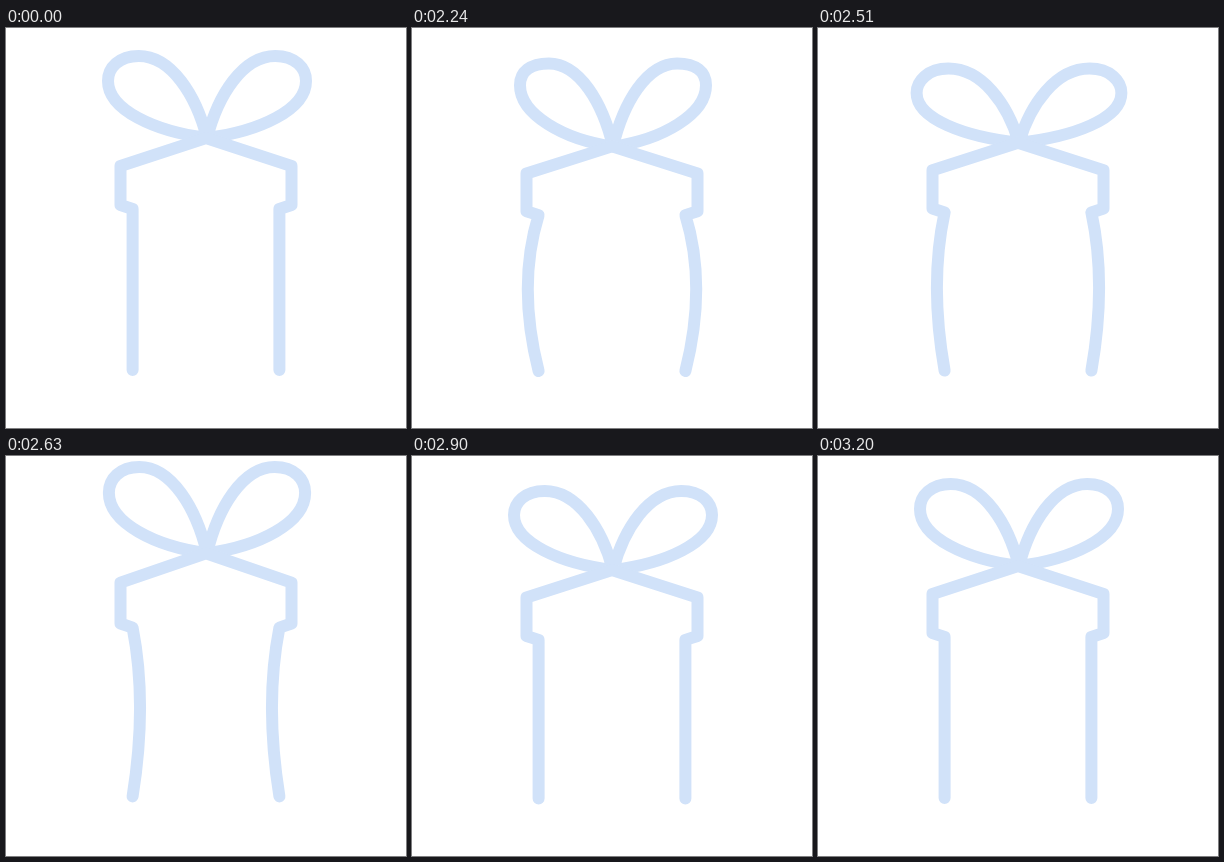
Recreate the animation shown at these times as an HTML page. Size 400 px wide and 400 px high, loop 3230 ms.

```html
<!DOCTYPE html>
<html lang="en">
<head>
<meta charset="utf-8">
<title>Gift ribbon</title>
<style>
  html, body { margin: 0; width: 100%; height: 100%; overflow: hidden; background: #fff; }
  svg { display: block; width: 100vw; height: 100vh; }
  path { fill: none; stroke: #d1e2f9; stroke-width: 12; stroke-linecap: round; stroke-linejoin: round; }
</style>
</head>
<body>
<svg viewBox="0 0 400 400">
  <path id="loops"/>
  <path id="sides"/>
</svg>
<script>
const LOOP = 3230, START = 2030, STEP = 30;
const KNOT = 110, PIVOT = 375;

// Key points [ms, value]: crouch, leap, landing, settle
const sink = [[1960, 0], [2340, 10], [2430, 10], [2710, -18], [2890, 4], [3110, -2], [3200, 0]];
const bend = [[1960, 0], [2340, -17.5], [2430, -17.5], [2680, 13], [2860, 0]];
const spread = [[1960, 99], [2240, 93], [2530, 102.5], [2660, 97.5], [2890, 99]];
const height = [[1960, 82], [2240, 83], [2530, 74], [2660, 88], [2890, 79], [3110, 82]];

// Sine ease in and out between key points
function at(track, t) {
  const i = track.findIndex(key => key[0] > t);
  if (i < 0) return track[track.length - 1][1];
  if (i === 0) return track[0][1];
  const [t0, a] = track[i - 1], [t1, b] = track[i];
  return a + (b - a) * (1 - Math.cos(Math.PI * (t - t0) / (t1 - t0))) / 2;
}

const pt = (x, y) => x.toFixed(2) + ',' + y.toFixed(2) + ' ';

// dir is -1 for the left half, 1 for the right half
function loopPath(dir, knot, w, h) {
  const p = (x, y) => pt(201 + dir * w * x, knot - h * y);
  const mid = 0.695 + (99 - w) * 0.007;
  return 'M' + p(0, 0)
    + 'C' + p(0.11, 0.52) + p(0.36, 1) + p(0.69, 1)
    + 'C' + p(0.89, 1) + p(1, mid + 0.16) + p(1, mid)
    + 'C' + p(1, mid - 0.35) + p(0.53, 0.08) + p(0, 0);
}

function sidePath(dir, knot, bow) {
  const scale = (PIVOT - knot) / (PIVOT - KNOT);
  const p = (x, y) => pt(200 + dir * x, PIVOT - (PIVOT - y) * scale);
  return 'M' + p(0, KNOT) + 'L' + p(85.5, 138) + 'L' + p(85.5, 177) + 'L' + p(73.4, 181)
    + 'C' + p(73.4 - bow * 1.1, 235) + p(73.4 - bow * 0.9, 288) + p(73.4, 342);
}

const loops = document.getElementById('loops');
const sides = document.getElementById('sides');

function draw(ms) {
  const t = ms < START ? 0 : ms - (ms - START) % STEP;
  const knot = KNOT + at(sink, t), w = at(spread, t), h = at(height, t), bow = at(bend, t);
  const both = half => half(-1) + half(1);
  loops.setAttribute('d', both(dir => loopPath(dir, knot, w, h)));
  sides.setAttribute('d', both(dir => sidePath(dir, knot, bow)));
}

const begin = performance.now();
function tick() {
  draw((performance.now() - begin) % LOOP);
  requestAnimationFrame(tick);
}
tick();
</script>
</body>
</html>
```
